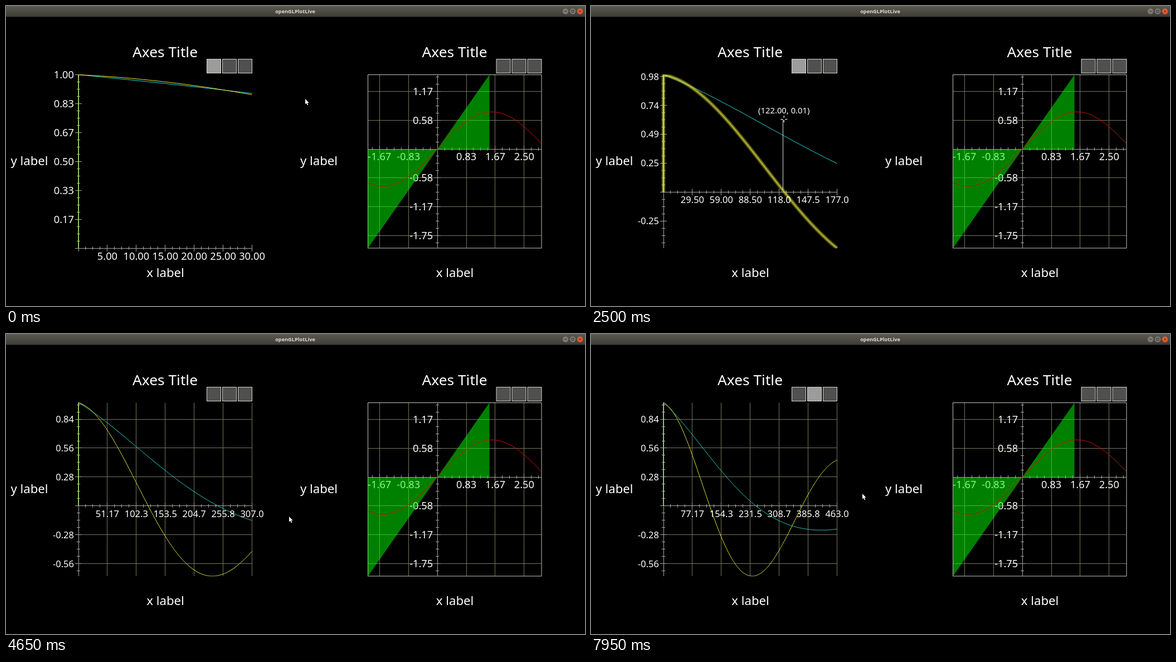
These frames come from a looping animation (1039 by 539 pixels, 8 s). An HTML page with a canvas:

```html
<!DOCTYPE html>
<html lang="en">
<head>
<meta charset="utf-8">
<title>openGLPlotLive</title>
<style>
html, body { margin: 0; width: 100%; height: 100%; overflow: hidden; background: #000; }
canvas { display: block; width: 1039px; height: 539px; }
</style>
</head>
<body>
<canvas id="stage" width="1039" height="539"></canvas>
<script>
const ctx = document.getElementById('stage').getContext('2d');
const LOOP = 8000, STEP = 50;
const SIZE = 311.5, TOP = 123.5, BOTTOM = TOP + SIZE;
const LEFT_X = 130, RIGHT_X = 649.5;
const FONT = '"Noto Sans", "Open Sans", sans-serif';
const GRID_ON = 3900, PAUSE_ON = 7200;

// [time, sample count]
const SAMPLES = [[0, 30], [1800, 135], [3250, 223], [4650, 307], [5900, 381], [6850, 441], [PAUSE_ON, 463]];

// [time, x, y]
const POINTER = [
  [0, 537, 167], [500, 537, 167], [1300, 240, 190], [1800, 268, 170], [2450, 345, 205],
  [3000, 399.6, 124], [3250, 393, 115], [3600, 372, 106], [4200, 372, 108],
  [4600, 508, 328], [5000, 508, 328], [5500, 300, 335], [5900, 341, 330],
  [6700, 396.5, 127], [6850, 408, 98], [7400, 403, 104], [7900, 487, 287]
];

const slow = n => n < 0 ? 0 : Math.exp(-0.00318 * n) * Math.cos(0.00637 * n);
const fast = n => n < 0 ? 0 : Math.exp(-0.00159 * n) * Math.cos(0.01274 * n);

function track(keys, t, ease) {
  const last = keys[keys.length - 1];
  if (t >= last[0]) return last.slice(1);
  const i = keys.findIndex(k => k[0] > t);
  const a = keys[i - 1], b = keys[i];
  const u = ease((t - a[0]) / (b[0] - a[0]));
  return a.slice(1).map((v, j) => v + (b[j + 1] - v) * u);
}
const countAt = t => Math.round(track(SAMPLES, t, u => u)[0]);
const pointerAt = t => track(POINTER, t, u => u * u * (3 - 2 * u));

function inBox([x, y], left, top, w, h) {
  return x >= left && x <= left + w && y >= top && y <= top + h;
}
const inPlot = p => inBox(p, LEFT_X, TOP, SIZE, SIZE);

function write(s, x, y, size, align = 'center', color = '#fff', weight = '') {
  ctx.font = `${weight} ${size}px ${FONT}`;
  ctx.textAlign = align;
  ctx.fillStyle = color;
  ctx.fillText(s, x, y);
}
const writeMid = (s, x, y, size, align) => write(s, x, y + size * 0.357, size, align);

function stroke(color, width, points) {
  ctx.strokeStyle = color;
  ctx.lineWidth = width;
  ctx.beginPath();
  points.forEach(([x, y]) => ctx.lineTo(x, y));
  ctx.stroke();
}
const crisp = v => Math.floor(v) + 0.5;
function hLine(x1, x2, y, color) { stroke(color, 1, [[x1, crisp(y)], [x2, crisp(y)]]); }
function vLine(x, y1, y2, color) { stroke(color, 1, [[crisp(x), y1], [crisp(x), y2]]); }

function makeView(left, x0, x1, y0, y1) {
  return {
    left, x0, x1, y0, y1,
    px: x => left + (x - x0) / (x1 - x0) * SIZE,
    py: y => BOTTOM - (y - y0) / (y1 - y0) * SIZE
  };
}

// Calls visit(position, index) for each tick counted outward from zero; every fourth is major.
function eachTick(zero, low, high, visit) {
  const gap = SIZE / 24;
  for (let i = Math.ceil((low - zero) / gap - 0.01); i <= (high - zero) / gap + 0.01; i++) {
    visit(zero + i * gap, i);
  }
}

function drawAxes(view, grid) {
  const { left } = view, right = left + SIZE;
  const zx = view.px(0), zy = view.py(0);
  const line = '#a5a5a0', faint = '#74745a';
  if (grid) {
    eachTick(zx, left, right, (x, i) => { if (i && i % 4 === 0) vLine(x, TOP, BOTTOM, faint); });
    eachTick(zy, TOP, BOTTOM, (y, i) => { if (i && i % 4 === 0) hLine(left, right, y, faint); });
  }
  hLine(left, right, zy, line);
  vLine(zx, TOP, BOTTOM, line);
  eachTick(zx, left, right, (x, i) => {
    const r = i % 4 ? 3 : 6;
    vLine(x, zy - r, zy + r, line);
  });
  eachTick(zy, TOP, BOTTOM, (y, i) => {
    const r = i % 4 ? 3 : 6;
    hLine(zx - r, zx + r, y, line);
  });
}

function drawTickLabels(view, size) {
  const zx = view.px(0), zy = view.py(0);
  const dx = (view.x1 - view.x0) / 6, dy = (view.y1 - view.y0) / 6;
  const show = v => v.toFixed(Math.abs(v) < 100 ? 2 : 1);
  eachTick(zx, view.left, view.left + SIZE, (x, i) => {
    if (i && i % 4 === 0) writeMid(show(i / 4 * dx), x, zy + 14, size);
  });
  eachTick(zy, TOP, BOTTOM, (y, i) => {
    if (i && i % 4 === 0) writeMid(show(-i / 4 * dy), zx - 8, y, size, 'right');
  });
}

function clipPlot(left, draw) {
  ctx.save();
  ctx.beginPath();
  ctx.rect(left - 4, TOP - 0.5, SIZE + 5, SIZE + 1);
  ctx.clip();
  draw();
  ctx.restore();
}

function drawSeries(view, fn, rgb, glow) {
  const points = [[view.px(0), view.py(0)]];
  for (let n = 0; n <= view.x1; n++) points.push([view.px(n), view.py(fn(n))]);
  if (glow) {
    stroke(`rgba(${rgb},.3)`, 7, points);
    stroke(`rgba(${rgb},.35)`, 4, points);
  }
  stroke(`rgb(${rgb})`, 1, points);
}

function drawButtons(right, lit, pointer) {
  for (let i = 0; i < 3; i++) {
    const x = right - 81 + i * 28, y = 95.5;
    ctx.fillStyle = lit === i ? '#9c9c9c' : '#505050';
    ctx.fillRect(x, y, 25, 25);
    ctx.strokeStyle = inBox(pointer, x, y, 25, 25) ? '#35b8b8' : '#d8d8cc';
    ctx.lineWidth = 1;
    ctx.strokeRect(x, y, 25, 25);
  }
}

function drawNames(left) {
  write('Axes Title', left + 155.5, 92.3, 26.3);
  write('x label', left + 156, 487, 22.2);
  write('y label', left - 88, 286, 22.2);
}

// The readout stays at its last place while the pointer is on the buttons.
function pickTime(t) {
  if (inPlot(pointerAt(t))) return t;
  if (!inBox(pointerAt(t), 357, 93, 87, 31)) return -1;
  while (t > 0 && !inPlot(pointerAt(t))) t -= STEP;
  return t;
}

function drawReadout(view, t) {
  const at = pickTime(t);
  if (at < 0) return;
  const [x, y] = pointerAt(at);
  const n = Math.floor((x - LEFT_X) / SIZE * countAt(at));
  const value = (at < 2400 ? slow : fast)(n);
  vLine(view.px(n), y + 1, view.py(value), '#ddd');
  writeMid(`(${n.toFixed(2)}, ${value.toFixed(2)})`, x, y - 15.5, 14.8);
}

function drawLeft(t, pointer) {
  const n = countAt(t);
  const low = Math.min(0, fast(Math.min(n, 237)));
  const view = makeView(LEFT_X, 0, n, low, 1);
  const hover = inPlot(pointer);
  drawAxes(view, t >= GRID_ON);
  clipPlot(LEFT_X, () => {
    drawSeries(view, slow, '40,222,215', hover && t < 2400);
    drawSeries(view, fast, '232,232,62', hover && t >= 2400);
  });
  drawTickLabels(view, n < 100 ? 18.3 : 16.5);
  drawNames(LEFT_X);
  drawReadout(view, t);
  drawButtons(441.5, t < GRID_ON ? 0 : t >= PAUSE_ON ? 1 : -1, pointer);
}

function drawRight(pointer) {
  const view = makeView(RIGHT_X, -2, 3, -2, 1.5);
  const { px, py } = view;
  drawAxes(view, true);
  drawTickLabels(view, 18.2);
  ctx.strokeStyle = '#c4c4bc';
  ctx.lineWidth = 1;
  ctx.strokeRect(RIGHT_X, TOP, SIZE, SIZE);
  ctx.fillStyle = 'rgba(0,255,0,.5)';
  for (const end of [-2, 1.5]) {
    ctx.beginPath();
    ctx.moveTo(px(0), py(0));
    ctx.lineTo(px(end), py(end));
    ctx.lineTo(px(end), py(0));
    ctx.fill();
  }
  const wave = [];
  for (let x = -2; x <= 3.001; x += 0.05) wave.push([px(x), py(0.75 * Math.sin(x))]);
  stroke('#d00c0c', 1, wave);
  drawNames(RIGHT_X);
  drawButtons(961, -1, pointer);
}

function drawTitleBar() {
  const shade = ctx.createLinearGradient(0, 0, 0, 19);
  shade.addColorStop(0, '#5a5950');
  shade.addColorStop(1, '#3d3c37');
  ctx.fillStyle = shade;
  ctx.fillRect(0, 0, 1039, 19.5);
  write('openGLPlotLive', 519, 13, 9.2, 'center', '#dfdbd2', 'bold');
  [1004, 1017, 1030].forEach((x, i) => {
    ctx.fillStyle = i === 2 ? '#e9592c' : '#7c7a71';
    ctx.beginPath();
    ctx.arc(x, 9.5, 5.2, 0, Math.PI * 2);
    ctx.fill();
    const ink = '#3a3833';
    if (i === 0) stroke(ink, 1, [[x - 2.5, 9.5], [x + 2.5, 9.5]]);
    if (i === 1) {
      ctx.strokeStyle = ink;
      ctx.strokeRect(x - 2, 7.5, 4, 4);
    }
    if (i === 2) {
      stroke(ink, 1, [[x - 2, 7.5], [x + 2, 11.5]]);
      stroke(ink, 1, [[x + 2, 7.5], [x - 2, 11.5]]);
    }
  });
}

function drawPointer(p) {
  const [x, y] = p;
  if (inPlot(p)) {
    for (const s of [-1, 1]) {
      stroke('#fff', 1.2, [[x + s * 2, y + 0.5], [x + s * 6, y + 0.5]]);
      stroke('#fff', 1.2, [[x, y + s * 2], [x, y + s * 6]]);
    }
    return;
  }
  const shape = [[0, 0], [0, 9.6], [2.2, 7.6], [3.8, 11.2], [5.3, 10.5], [3.8, 7], [6.7, 7]];
  ctx.beginPath();
  shape.forEach(([dx, dy]) => ctx.lineTo(x + dx, y + dy));
  ctx.closePath();
  ctx.strokeStyle = '#000';
  ctx.lineWidth = 1.6;
  ctx.stroke();
  ctx.fillStyle = '#fff';
  ctx.fill();
}

function draw(t) {
  const pointer = pointerAt(t);
  ctx.fillStyle = '#000';
  ctx.fillRect(0, 0, 1039, 539);
  drawLeft(t, pointer);
  drawRight(pointer);
  drawTitleBar();
  drawPointer(pointer);
}

const start = performance.now();
function tick() {
  const t = Math.max(0, performance.now() - start) % LOOP;
  draw(Math.floor(t / STEP) * STEP);
  requestAnimationFrame(tick);
}
tick();
</script>
</body>
</html>
```
